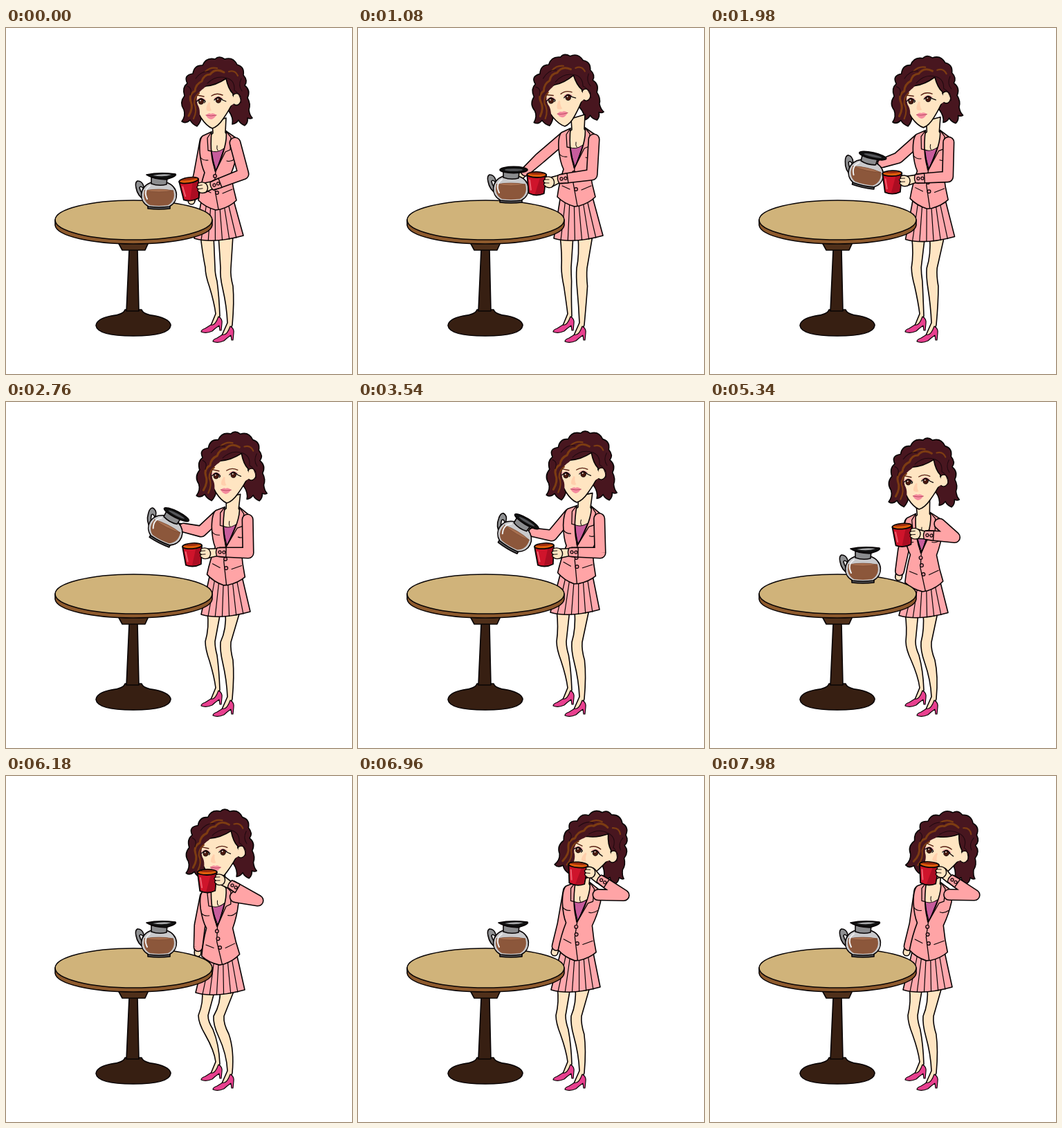
These frames come from a looping animation (500 by 500 pixels, 8 s). An HTML page with a canvas:

```html
<!DOCTYPE html>
<html lang="en">
<head>
<meta charset="utf-8">
<title>Coffee break</title>
<style>
html, body { margin: 0; width: 100%; height: 100%; overflow: hidden; background: #fff; }
canvas { display: block; width: 100%; height: 100%; }
</style>
</head>
<body>
<canvas id="stage"></canvas>
<script>
const LOOP = 8000, STEP = 60, SIZE = 500;
const canvas = document.getElementById('stage');
const ctx = canvas.getContext('2d');
const ratio = Math.max(1, window.devicePixelRatio || 1);
canvas.width = canvas.height = SIZE * ratio;

const INK = '#080405', PINK = '#ffa4a6', SKIN = '#ffe5c2', HAIR = '#48161f';
const GLOSS = '#7d3c12', SHOE = '#e8408f', WOOD = '#371f12';

// head, torso: x, y, degrees; skirt: x, y; limb joints are stage points
const idle = {
  head: [0, 0, 0], torso: [0, 0, 0], skirt: [0, 0], knee: [0],
  elbowL: [279, 212], handL: [268, 250], elbowR: [343, 211], wrist: [301, 227],
  mug: [266, 234, -8], pot: [221, 240, 0]
};
const grab = {
  head: [1, -3, -6], torso: [10, -5, 0], skirt: [11, 0], knee: [6],
  elbowL: [263, 188], handL: [236, 213], elbowR: [338, 212], wrist: [294, 218],
  mug: [258, 226, 1], pot: [221, 231, 0]
};
const lift = {
  head: [21, 1, 1], torso: [12, 2, 4], skirt: [10, 3], knee: [0],
  elbowL: [282, 187], handL: [249, 180], elbowR: [350, 218], wrist: [309, 217],
  mug: [270, 222, -4], pot: [231, 184, 27]
};
const pour = {
  ...lift,
  head: [18, 0, 1], torso: [10, 0, 5], skirt: [6, 0], knee: [-1],
  elbowL: [280, 193], handL: [245, 187], pot: [227, 193, 31]
};
const sip = {
  ...idle,
  head: [6, 6, 1], torso: [5, 10, -3], skirt: [2, 9], knee: [-10],
  elbowL: [280, 216], handL: [277, 256], elbowR: [364, 180], wrist: [327, 158],
  mug: [291, 153, -1]
};
const drink = {
  ...idle,
  head: [25, 4, 14], torso: [10, 4, 3], skirt: [7, 5], knee: [-2],
  elbowL: [296, 214], handL: [284, 255], elbowR: [382, 172], wrist: [350, 150],
  mug: [316, 142, 4]
};
const dip = { ...mix(idle, sip, 0.5), head: [4, 10, 1], torso: [4, 11, -2] };
const lean = {
  ...drink, head: [28, 3, 15], torso: [12, 4, 4], elbowR: [387, 173],
  wrist: [354, 151], mug: [319, 143, 5]
};

const keys = [
  [0, idle], [1080, grab], [1620, mix(grab, lift, 0.12)], [2460, lift], [2760, lift],
  [3540, pour], [4200, grab], [4259, grab], [4260, idle], [4620, idle], [5100, dip],
  [5760, dip], [6180, sip], [6720, drink], [7260, lean], [7980, drink], [LOOP, drink]
];

function mix(a, b, k) {
  const out = {};
  for (const part in a) out[part] = a[part].map((v, i) => v + (b[part][i] - v) * k);
  return out;
}

function poseAt(t) {
  const i = Math.max(1, keys.findIndex(k => k[0] > t));
  const [t0, a] = keys[i - 1], [t1, b] = keys[i];
  const k = (t - t0) / (t1 - t0);
  return mix(a, b, k * k * (3 - 2 * k));
}

function draw(d, fill, stroke = INK, width = 1.6) {
  const p = new Path2D(d);
  if (fill) { ctx.fillStyle = fill; ctx.fill(p); }
  if (stroke) { ctx.strokeStyle = stroke; ctx.lineWidth = width; ctx.stroke(p); }
}

function oval(x, y, rx, ry, fill, stroke = INK, width = 1.6, turn = 0) {
  ctx.beginPath();
  ctx.ellipse(x, y, rx, ry, turn, 0, 7);
  if (fill) { ctx.fillStyle = fill; ctx.fill(); }
  if (stroke) { ctx.strokeStyle = stroke; ctx.lineWidth = width; ctx.stroke(); }
}

// Runs fn in a frame moved to x, y and turned; (px, py) is the pivot in part coordinates
function within(x, y, deg, px, py, fn) {
  ctx.save();
  ctx.translate(x, y);
  ctx.rotate(deg * Math.PI / 180);
  ctx.translate(-px, -py);
  fn();
  ctx.restore();
}

// Round-jointed tapered limb with a single outer outline
function limb(joints, radii, fill) {
  const path = new Path2D();
  joints.forEach(([x, y], i) => {
    const r = radii[i];
    path.moveTo(x + r, y);
    path.arc(x, y, r, 0, 2 * Math.PI);
    if (!i) return;
    const [px, py] = joints[i - 1], pr = radii[i - 1];
    const a = Math.atan2(y - py, x - px), nx = -Math.sin(a), ny = Math.cos(a);
    path.moveTo(px + nx * pr, py + ny * pr);
    path.lineTo(px - nx * pr, py - ny * pr);
    path.lineTo(x - nx * r, y - ny * r);
    path.lineTo(x + nx * r, y + ny * r);
    path.closePath();
  });
  ctx.strokeStyle = INK;
  ctx.lineWidth = 3.2;
  ctx.stroke(path);
  ctx.fillStyle = fill;
  ctx.fill(path);
}

function torsoPoint(p, x, y) {
  const a = p.torso[2] * Math.PI / 180, dx = x - 305, dy = y - 255;
  return [
    305 + p.torso[0] + dx * Math.cos(a) - dy * Math.sin(a),
    255 + p.torso[1] + dx * Math.sin(a) + dy * Math.cos(a)
  ];
}

function drawTable() {
  draw('M172 407H196Q198 414 216 416Q238 421 238 430Q236 445 184 445Q132 445 130 430Q131 420 152 416Q170 414 172 407Z', WOOD);
  draw('M178 320H190L192 409H174Z', WOOD);
  draw('M162 310H206L201 321H168Z', '#50301a');
  draw('M71 277V285C73 301 125 312 184 312S296 301 298 285V277Z', '#8e5a2d');
  oval(184.5, 277.5, 113.5, 28.5, '#d0b37a');
}

function drawPot(x, y, deg, held) {
  within(x, y, deg, 0, 0, () => {
    draw('M-22 -11Q-24 -19 -31 -19Q-35 -17 -33 -9Q-31 3 -20 9L-20 4Q-26 -1 -28 -9Q-27 -13 -22 -8Z', '#8f9092');
    draw('M-16 17H16V21Q0 23 -16 21Z', '#58585a');
    draw('M-11 -17C-29 -10 -30 10 -15 18Q0 20 15 18C30 10 29 -10 11 -17Z', '#c9c9cb');
    draw('M-21 -5Q0 -9 21 -5C24 6 19 13 13 16Q0 18 -13 16C-19 13 -24 6 -21 -5Z', '#8c573b', null);
    draw('M-21 -5Q0 -9 21 -5Q0 -1 -21 -5Z', '#a87050', '#74452e', 0.6);
    draw('M-17 7Q-23 -5 -13 -12', null, '#eeeeef', 2);
    draw('M-11 -24H12L11 -14Q0 -11 -11 -15Z', '#8b8c8e');
    if (held) {
      oval(4, -26, 20, 4.6, '#111');
      oval(4, -26, 13, 1.8, '#55565a', null);
    } else {
      draw('M-18 -28Q0 -32 24 -29Q26 -27 19 -24L10 -21Q-9 -22 -18 -28Z', '#111');
      draw('M-9 -27Q6 -30 18 -28Q7 -24 -9 -27Z', '#a6a7a9', null);
    }
  });
}

function drawLegs(p) {
  const [sx, sy] = p.skirt, k = p.knee[0];
  const top = 300 + sy;
  draw(`M${281 + sx} ${top}Q${284 + sx} 326 ${288 + k} 346Q${288 + k} 357 ${294 + k * 0.6} 374Q301 397 303 413L296 430L304 432L309 416Q308 388 ${305 + k * 0.6} 366Q${302 + k} 355 ${302 + k} 346L${300 + sx} ${top}Z`, SKIN);
  draw(`M${307 + sx} ${top}Q${309 + sx} 328 ${310 + k} 347Q${309 + k} 359 ${313 + k * 0.6} 376Q319 402 320 426L312 444L321 446L327 429Q330 396 ${328 + k * 0.6} 373Q${324 + k} 358 ${325 + k} 347L${328 + sx} ${top}Z`, SKIN);
  drawShoe(0, 0);
  drawShoe(17, 14);
}

function drawShoe(x, y) {
  within(x, y, 0, 0, 0, () =>
    draw('M307 417Q313 420 312 427L311 437H309L308 430Q302 434 298 438Q289 442 282 439Q282 436 288 434L296 429Q302 431 307 417Z', SHOE, INK, 1.2));
}

function drawSkirt(p) {
  const [sx, sy] = p.skirt, [tx, ty] = p.torso;
  const topL = 283 + tx, topR = 328 + tx, topY = 246 + ty;
  const left = 272 + sx, right = 343 + sx, low = 305 + sy;
  draw(`M${topL} ${topY}L${left} ${low - 1}Q${300 + sx} ${low + 7} ${right} ${low - 5}L${topR} ${topY}Z`, '#ffa8ad');
  for (let i = 1; i < 7; i++) {
    const u = i / 7;
    const y = low + 2 - 18 * (u - 0.4) ** 2;
    draw(`M${topL + 45 * u} ${topY + 10}L${left + 71 * u} ${y}`, null, INK, 1.2);
  }
}

function drawLeftArm(p) {
  const shoulder = torsoPoint(p, 288, 163);
  const [ex, ey] = p.elbowL, [hx, hy] = p.handL;
  const sleeve = [ex + (hx - ex) * 0.78, ey + (hy - ey) * 0.78];
  limb([sleeve, p.handL], [4, 4], SKIN);
  limb([shoulder, p.elbowL, sleeve], [7, 7, 5.5], PINK);
}

function drawTorso(p) {
  const [x, y, deg] = p.torso;
  within(305 + x, 255 + y, deg, 305, 255, () => {
    draw('M298 136L299 152L292 158L302 207L323 158L317 151L318 130Z', SKIN);
    draw('M295 177Q304 182 315 174L304 206Z', '#c75c9c', INK, 1);
    draw('M305 170Q304 175 306 177', null, INK, 1);
    draw('M297 150L284 156Q279 161 280 180Q282 199 287 209Q281 227 278 249Q288 259 303 263L310 262Q324 258 333 249Q328 231 325 211Q332 194 335 176Q335 161 331 158L318 149Q321 168 303 207Q294 185 297 150Z', PINK);
    draw('M297 150L291 159L292 177L297 178L302 207M318 149L325 158L324 176L317 179L303 207L301 229L307 262', null, INK, 1.3);
    draw('M281 187Q285 192 292 191M331 189Q325 194 319 192M285 233L296 238M313 239L327 233', null, INK, 1.1);
    for (const [bx, by] of [[302, 214], [303, 225], [305, 238]]) oval(bx, by, 2.4, 2.4, '#e98994', INK, 1.2);
  });
}

function inHead(p, fn) {
  within(298 + p.head[0], 145 + p.head[1], p.head[2], 298, 145, fn);
}

function drawHair() {
  draw('M283 126Q282 136 276 142Q269 139 266 133Q260 139 254 135Q260 127 257 118Q250 108 258 98Q254 86 262 80Q256 68 270 66Q272 53 284 54Q289 42 302 45Q308 39 316 45Q328 41 334 53Q345 56 343 68Q350 76 345 83Q354 90 349 101Q354 110 351 118Q352 126 356 130Q353 132 349 130Q350 137 345 141Q338 138 336 133Q333 138 327 139Q329 130 322 120Z', HAIR);
}

function drawEye(x, y, side) {
  draw(`M${x - 7} ${y - 2}Q${x} ${y - 9} ${x + 7} ${y - 2}Z`, '#f5a6ac', null);
  draw(`M${x - 6} ${y}Q${x} ${y - 6} ${x + 6} ${y}Q${x} ${y + 6} ${x - 6} ${y}Z`, '#fff', null);
  oval(x, y, 3.8, 4.2, '#4a1a10', INK, 0.8);
  oval(x - 1, y - 1.2, 0.9, 0.9, '#fff', null);
  draw(`M${x - 6} ${y}Q${x} ${y - 7} ${x + 6} ${y}l${side * 4} 2`, null, INK, 1.3);
}

function drawFace() {
  oval(333, 103, 6.5, 8.5, SKIN, INK, 1.3);
  draw('M274 95Q273 117 282 130Q290 142 298 145Q306 143 314 131Q323 118 328 107L328 95Q321 88 318 73Q303 83 289 84Q278 88 274 95Z', SKIN);
  draw('M325 96Q331 99 330 109L322 114Z', SKIN, null);
  draw('M317 73Q295 73 286 87Q272 96 277 111Q283 120 277 139Q270 130 272 113Q265 101 273 89Q279 75 296 67Q309 64 317 73Z', HAIR, null);
  draw('M264 127Q271 115 267 106Q264 96 273 91Q274 81 283 77Q286 67 295 67Q303 57 315 64', null, GLOSS, 3);
  draw('M271 131Q277 119 272 109Q272 99 279 94M288 63Q295 56 305 58M322 63Q331 60 335 69', null, GLOSS, 2.2);
  draw('M318 72Q303 68 291 80M318 72Q331 75 330 90Q338 94 340 108M274 73Q283 61 294 63M340 73Q335 83 341 91M262 84Q270 87 266 97', null, '#210910', 1.1);
  draw('M276 97L286 99M297 98Q304 93 313 97', null, '#592114', 1.4);
  drawEye(282, 106, -0.3);
  drawEye(307, 104, 1.2);
  draw('M293 107Q288 115 290 119Q294 121 297 119Q294 115 295 108Z', '#ffd0ad', null);
  draw('M289 126Q293 122 296 124Q300 122 304 126Q300 132 296 132Q291 131 289 126Z', '#f58c9f', null);
  draw('M289 126Q296 128 304 126', null, '#b84963', 1);
}

function drawMug(x, y, deg) {
  within(x, y, deg, 0, 0, () => {
    draw('M-14 -14L-11 13Q0 18 11 13L14 -14Z', '#cf142b', INK, 1.8);
    draw('M5 -10L-2 14Q8 14 10 11L13 -11Z', '#ab0d22', null);
    draw('M-10 -6L-8 8', null, '#ef6070', 2);
    oval(0, -14, 14, 4, '#e15f0c', INK, 1.8);
    draw('M-12 -15Q0 -20 12 -15Q0 -13 -12 -15Z', '#9b2b0c', null);
  });
}

function drawRightArm(p) {
  const shoulder = torsoPoint(p, 331, 166);
  const [mx, my, deg] = p.mug, [wx, wy] = p.wrist, [ex, ey] = p.elbowR;
  const a = Math.atan2(ey - wy, ex - wx) * 180 / Math.PI;
  limb([shoulder, p.elbowR, p.wrist], [7, 7, 6], PINK);
  drawMug(mx, my, deg);
  limb([[mx + 20, my - 3], [wx - 3, wy]], [6, 4.5], SKIN);
  within(mx + 17, my - 3, deg, 0, 0, () => {
    draw('M-5 -7Q2 -10 7 -5Q11 2 5 7Q-2 9 -5 5Q-8 3 -5 1Q-9 -2 -5 -4Z', SKIN, INK, 1.4);
    draw('M-5 1H1M-5 -4H1', null, INK, 0.9);
  });
  within(wx, wy, a, 0, 0, () => {
    draw('M-4 -6Q-7 0 -4 6L9 7V-7Z', PINK, INK, 1.4);
    oval(0, 0, 2.1, 2.1, '#e98994', INK, 1.2);
    oval(6, 0, 2.1, 2.1, '#e98994', INK, 1.2);
  });
}

function render(t) {
  const p = poseAt(t);
  ctx.setTransform(ratio, 0, 0, ratio, 0, 0);
  ctx.fillStyle = '#fff';
  ctx.fillRect(0, 0, SIZE, SIZE);
  ctx.lineJoin = ctx.lineCap = 'round';
  drawLeftArm(p);
  drawLegs(p);
  drawSkirt(p);
  inHead(p, drawHair);
  drawTorso(p);
  inHead(p, drawFace);
  drawTable();
  const held = t >= 780 && t < 4260;
  const [x, y, deg] = held ? p.pot : idle.pot;
  drawPot(x, y, deg, held);
  drawRightArm(p);
}

const start = performance.now();
function tick() {
  const t = (performance.now() - start) % LOOP;
  render(Math.floor(t / STEP) * STEP);
  requestAnimationFrame(tick);
}
tick();
</script>
</body>
</html>
```
